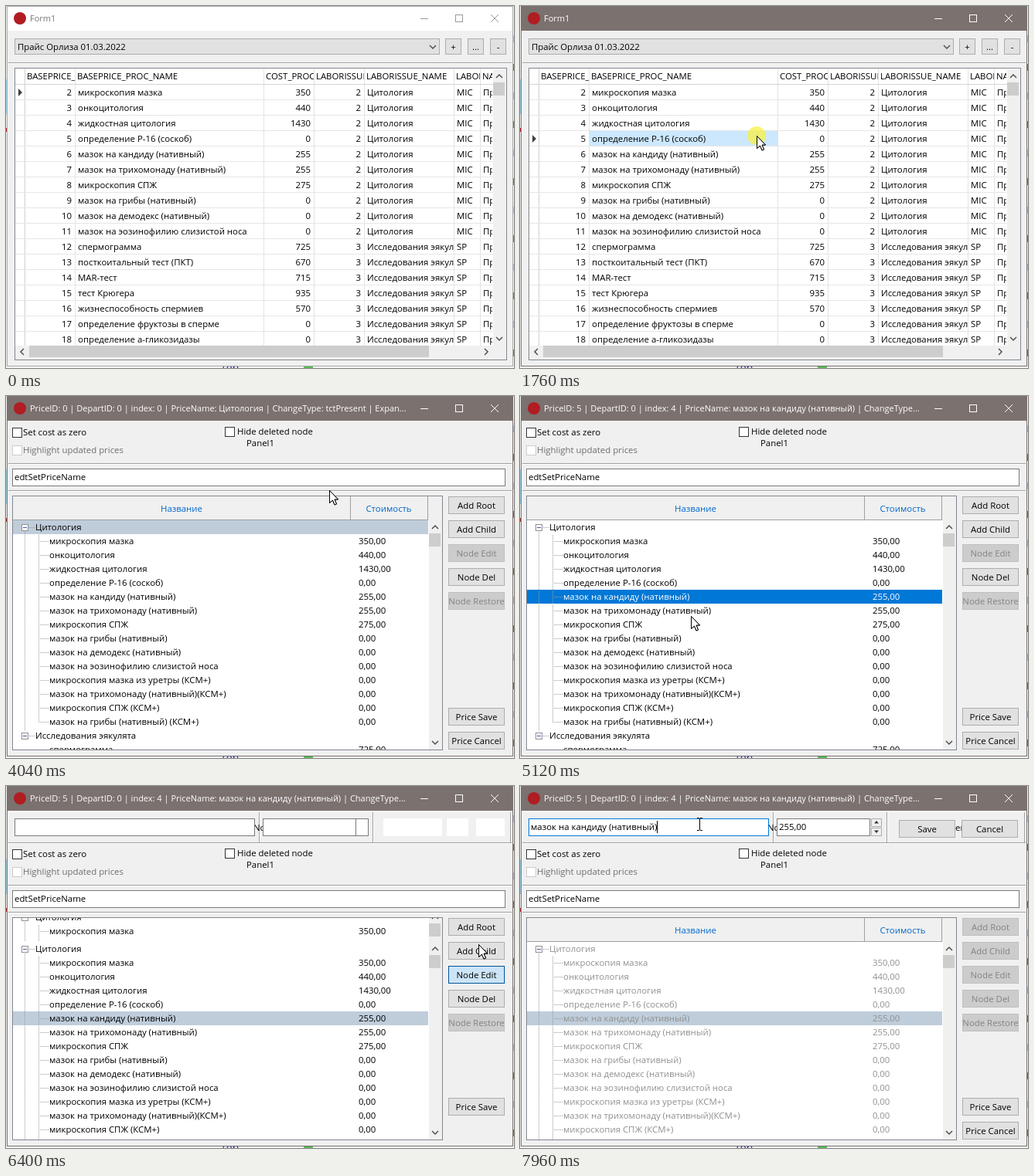
Animation, 657 px wide and 469 px high, one loop 8000 ms. Source, as an HTML page with a canvas:

```html
<!DOCTYPE html>
<html lang="ru">
<head>
<meta charset="utf-8">
<style>
  html, body { margin: 0; width: 100%; height: 100%; overflow: hidden; }
  canvas { display: block; }
</style>
</head>
<body>
<canvas id="stage" width="657" height="469"></canvas>
<script>
const ctx = document.getElementById('stage').getContext('2d');
const LOOP = 8000;
const FACE = '#f0f0f0', BLUE = '#0078d7', TITLE = '#7b716f', GRAY = '#a0a0a0';

const NAMES = ['микроскопия мазка', 'онкоцитология', 'жидкостная цитология',
  'определение P-16 (соскоб)', 'мазок на кандиду (нативный)', 'мазок на трихомонаду (нативный)',
  'микроскопия СПЖ', 'мазок на грибы (нативный)', 'мазок на демодекс (нативный)',
  'мазок на эозинофилию слизистой носа', 'спермограмма', 'посткоитальный тест (ПКТ)',
  'MAR-тест', 'тест Крюгера', 'жизнеспособность спермиев', 'определение фруктозы в сперме',
  'определение а-гликозидазы'];
const COSTS = [350, 440, 1430, 0, 255, 255, 275, 0, 0, 0, 725, 670, 715, 935, 570, 0, 0];
const EXTRA = ['микроскопия мазка из уретры (КСМ+)', 'мазок на трихомонаду (нативный)(КСМ+)',
  'микроскопия СПЖ (КСМ+)', 'мазок на грибы (нативный) (КСМ+)'];
const CHILDREN = [...NAMES.slice(0, 10), ...EXTRA];

// Event times, ms
const ACTIVATE = 1680, PLUS = 3120, EDITOR = 3960, SELECT = 4920, ENABLE = 5200,
  EDIT = 6280, SETTLED = 6600, FOCUS = 7960;
const CLICKS = [[ACTIVATE, 1840], [PLUS, 3320], [SELECT, 5040], [EDIT, 6360], [7840, FOCUS]];
// Pointer path: time, x, y
const PATH = [[80, 464, 390], [440, 395, 114], [760, 349, 174], [1120, 349, 174], [1240, 306, 168],
  [1840, 306, 168], [2480, 420, 414], [2560, 420, 414], [2880, 633, 57], [3120, 576, 55],
  [3320, 575, 57], [3360, 575, 57], [3760, 418, 122], [4040, 418, 122],
  [4760, 226, 262], [4920, 226, 262], [5120, 221, 285], [5250, 230, 302], [5680, 598, 208],
  [5760, 598, 208], [6120, 611, 205], [6640, 611, 205], [7040, 600, 137], [7120, 600, 137],
  [7860, 232, 49], [LOOP, 232, 49]];

let now = 0, mouse = { x: -99, y: -99 }, beam = false;

function pointerAt(t) {
  if (t < PATH[0][0]) return { x: -99, y: -99 };
  const i = PATH.findIndex(p => p[0] > t);
  const [t0, x0, y0] = PATH[i - 1], [t1, x1, y1] = PATH[i];
  const u = (t - t0) / (t1 - t0), e = u * u * (3 - 2 * u);
  return { x: Math.round(x0 + (x1 - x0) * e), y: Math.round(y0 + (y1 - y0) * e) };
}

const hovers = (x, y, w, h) =>
  mouse.x >= x && mouse.x < x + w && mouse.y >= y && mouse.y < y + h;

function rect(x, y, w, h, color) {
  ctx.fillStyle = color;
  ctx.fillRect(x, y, w, h);
}

function box(x, y, w, h, fill, border, line = 1) {
  rect(x, y, w, h, border);
  rect(x + line, y + line, w - 2 * line, h - 2 * line, fill);
}

function path(points, color, width = 1) {
  ctx.beginPath();
  points.forEach(([x, y]) => ctx.lineTo(x, y));
  ctx.strokeStyle = color;
  ctx.lineWidth = width;
  ctx.stroke();
}

function triangle(points, color) {
  ctx.beginPath();
  points.forEach(([x, y]) => ctx.lineTo(x, y));
  ctx.fillStyle = color;
  ctx.fill();
}

function disc(x, y, r, color) {
  ctx.beginPath();
  ctx.arc(x, y, r, 0, 7);
  ctx.fillStyle = color;
  ctx.fill();
}

// y is the middle of the lowercase letters
function text(s, x, y, color = '#000', align = 'left', size = 11.4) {
  ctx.font = size + 'px "Open Sans", "Noto Sans", sans-serif';
  ctx.textAlign = align;
  ctx.fillStyle = color;
  ctx.fillText(s, x, Math.round(y) + 4);
}

function clipped(x, y, w, h, draw) {
  ctx.save();
  ctx.beginPath();
  ctx.rect(x, y, w, h);
  ctx.clip();
  draw();
  ctx.restore();
}

function chevron(x, y, dx, dy, color = '#505050') {
  const tip = [x + dx * 2, y + dy * 2];
  path([[x - dx * 2 - dy * 4, y - dy * 2 - dx * 4], tip, [x - dx * 2 + dy * 4, y - dy * 2 + dx * 4]], color, 1.5);
}

function button(label, x, y, w, h, { off, focus, pressed, still } = {}) {
  const hot = !off && !still && hovers(x, y, w, h);
  if (off) box(x, y, w, h, '#ccc', '#bfbfbf');
  else if (pressed) box(x, y, w, h, '#cce4f7', '#005499');
  else if (hot) box(x, y, w, h, '#e5f1fb', BLUE);
  else box(x, y, w, h, '#e1e1e1', focus ? BLUE : '#adadad', focus ? 2 : 1);
  text(label, x + w / 2, y + h / 2, off ? '#838383' : '#000', 'center');
}

function edit(s, x, y, w, h, focused) {
  const hot = hovers(x, y, w, h);
  beam = beam || hot;
  box(x, y, w, h, '#fff', focused ? BLUE : hot ? '#171717' : '#7a7a7a');
  text(s, x + 3, y + h / 2 - .5);
}

function checkbox(label, x, y, off) {
  box(x, y, 13, 13, '#fff', off ? '#ccc' : '#333');
  text(label, x + (x > 200 ? 16 : 14), y + 6, off ? '#6d6d6d' : '#000');
}

function groove(y) {
  rect(3, y, 651, 1, GRAY);
  rect(3, y + 1, 651, 1, '#fff');
}

function vScroll(x, top, bottom, thumb) {
  rect(x, top, 17, bottom - top, FACE);
  rect(x, thumb, 15, 17, '#cdcdcd');
  chevron(x + 8, top + 9, 0, -1);
  chevron(x + 8, bottom - 9, 0, 1);
}

function desktop() {
  rect(0, 0, 657, 469, '#f4f4f4');
  rect(0, 95, 1, 45, '#9cd3ee');
  rect(0, 158, 1, 5, '#b03030');
  for (let y = 38; y < 460; y += 37) rect(656, y, 1, 9, y % 2 ? '#5572b0' : '#d8c452');
  clipped(260, 467, 200, 2, () => {
    text('тор', 278, 470, '#2020a0', 'left', 14);
    rect(385, 467, 12, 2, '#58b858');
  });
}

function windowFrame(title, active) {
  const ink = active ? '#fff' : '#999';
  box(1, 0, 655, 467, FACE, active ? TITLE : '#aaa');
  rect(2, 1, 653, 31, active ? TITLE : '#fff');
  disc(18, 16, 8, '#b01d22');
  text(title, 31, 16, active ? '#fff' : '#777', 'left', 11);
  rect(536, 16, 10, 1, ink);
  ctx.strokeStyle = ink;
  ctx.lineWidth = 1;
  ctx.strokeRect(581.5, 11.5, 9, 9);
  path([[627, 11], [637, 21]], ink);
  path([[637, 11], [627, 21]], ink);
}

function priceList() {
  const active = now >= ACTIVATE, current = active ? 3 : 0;
  windowFrame('Form1', active);
  box(11, 42, 550, 21, '#e1e1e1', '#adadad');
  text('Прайс Орлиза 01.03.2022', 15, 53);
  chevron(552, 53, 0, 1);
  const pressed = now >= PLUS && now < 3320;
  button('+', 568, 42, 21, 21, { pressed, focus: now >= PLUS, still: now >= 3320 });
  button('...', 597, 42, 21, 21);
  button('-', 626, 42, 21, 21);
  groove(73);

  box(11, 80, 637, 379, '#fff', '#828790');
  const columns = [[25, 'BASEPRICE_ID'], [90, 'BASEPRICE_PROC_NAME'], [334, 'COST_PROC'],
    [399, 'LABORISSUE_ID'], [464, 'LABORISSUE_NAME'], [580, 'LABORISSUE'], [614, 'NAME'], [630]];
  clipped(12, 81, 618, 360, () => {
    columns.slice(0, -1).forEach(([x, label], c) => {
      rect(x - 1, 81, 1, 360, c ? '#e3e3e3' : '#d0d0d0');
      clipped(x, 81, columns[c + 1][0] - x - 1, 20, () => text(label, x + 2, 91));
    });
    rect(12, 101, 618, 1, '#d5d5d5');
    NAMES.forEach((name, i) => {
      const y = 112 + i * 20, cytology = i < 10;
      if (active && i === current) rect(90, y - 10, 243, 19, '#cce8ff');
      rect(12, y + 9, 618, 1, '#e6e6e6');
      text(String(i + 2), 85, y, '#000', 'right');
      text(name, 93, y);
      text(String(COSTS[i]), 394, y, '#000', 'right');
      text(cytology ? '2' : '3', 459, y, '#000', 'right');
      clipped(464, y - 10, 115, 20, () => text(cytology ? 'Цитология' : 'Исследования эякулята', 467, y));
      text(cytology ? 'MIC' : 'SP', 583, y);
      clipped(614, y - 10, 15, 20, () => text('Прайс', 617, y));
    });
  });
  const y = 112 + current * 20;
  triangle([[16, y - 5], [21, y], [16, y + 5]], '#404040');
  vScroll(630, 82, 440, 99);
  rect(12, 440, 635, 18, FACE);
  rect(30, 440, 517, 15, '#cdcdcd');
  chevron(21, 448, -1, 0);
  chevron(621, 448, 1, 0);
}

function dots(x, y, dx, dy, length) {
  for (let d = 0; d < length; d += 2) rect(x + dx * d, y + dy * d, 1, 1, '#999');
}

function treeRoot(label, y, ink) {
  dots(30, y, 1, 0, 7);
  box(20, y - 4, 9, 9, '#fff', '#919191');
  rect(22, y, 5, 1, '#4b5da8');
  text(label, 38, y, ink);
}

function treeRows(top, selected, disabled) {
  const rowY = i => top + 9 + i * 18;
  const ink = disabled ? '#909090' : '#000';
  const focused = now >= SELECT && now < EDIT;
  rect(9, top, 555, 458 - top, '#fff');
  rect(9, rowY(selected) - 9, 537, 18, focused ? BLUE : '#bfcddb');
  dots(24, rowY(0) + 6, 0, 1, 258);
  dots(42, rowY(0) + 10, 0, 1, 243);
  treeRoot('Цитология', rowY(0), ink);
  treeRoot('Исследования эякулята', rowY(15), ink);
  const child = (name, cost, i) => {
    const color = focused && i === selected ? '#fff' : ink;
    dots(42, rowY(i), 1, 0, 13);
    text(name, 56, rowY(i), color);
    text(cost + ',00', 456, rowY(i), color);
  };
  CHILDREN.forEach((name, i) => child(name, i < 10 ? COSTS[i] : 0, i + 1));
  child('спермограмма', 725, 16);
  vScroll(547, top, 458, top + 17);
}

function treeHeader(y) {
  rect(9, y, 555, 31, FACE);
  rect(9, y + 30, 537, 1, GRAY);
  for (const x of [445, 545]) rect(x, y, 1, 31, GRAY);
  text('Название', 227, y + 16, '#0066cc', 'center');
  text('Стоимость', 495, y + 16, '#0066cc', 'center');
}

function editPanel(repainting) {
  rect(3, 33, 651, 1, '#fff');
  rect(3, 34, 1, 39, '#fff');
  for (const x of [327, 474, 652]) {
    rect(x, 34, 1, 39, GRAY);
    rect(x + 1, 34, 1, 39, '#fff');
  }
  groove(73);
  clipped(320, 42, 12, 24, () => text('Node', 320, 54));
  edit(repainting ? '' : NAMES[4], 11, 42, 311, 23, now >= FOCUS);
  if (now >= FOCUS) rect(Math.round(14 + ctx.measureText(NAMES[4]).width), 45, 1, 16, '#000');
  edit(repainting ? '' : '255,00', 332, 42, 121, 23);
  if (repainting) {
    box(452, 42, 17, 23, '#fff', '#7a7a7a');
    for (const [x, w] of [[488, 76], [570, 28], [608, 37]]) rect(x, 42, w, 23, '#fff');
    return;
  }
  for (const [y, dir] of [[42, -1], [54, 1]]) {
    const base = y + 5 - dir * 1.5;
    box(454, y, 14, 11, FACE, '#adadad');
    triangle([[458, base], [464, base], [461, y + 5 + dir * 2]], '#333');
  }
  text('er', 563, 54);
  button('Save', 490, 44, 73, 23);
  button('Cancel', 571, 44, 73, 23);
}

function priceEditor() {
  const selected = now >= SELECT ? 5 : 0;
  const editing = now >= EDIT, repainting = editing && now < SETTLED, locked = now >= SETTLED;
  const shift = editing ? 41 : 0;
  windowFrame(selected
    ? 'PriceID: 5 | DepartID: 0 | index: 4 | PriceName: мазок на кандиду (нативный) | ChangeType...'
    : 'PriceID: 0 | DepartID: 0 | index: 0 | PriceName: Цитология | ChangeType: tctPresent | Expan...', true);
  if (editing) editPanel(repainting);
  checkbox('Set cost as zero', 8, 41 + shift);
  checkbox('Highlight updated prices', 8, 64 + shift, true);
  checkbox('Hide deleted node', 283, 40 + shift);
  text('Panel1', 311, 61 + shift);
  groove(87 + shift);
  edit('edtSetPriceName', 8, 94 + shift, 638, 23);
  groove(122 + shift);

  box(8, 129 + shift, 557, 330 - shift, '#fff', '#828790');
  clipped(9, 130 + shift, 555, 328 - shift, () => {
    if (repainting) treeRows(161, selected, false);
    else treeHeader(130 + shift);
    clipped(9, 161 + shift, 555, 297 - shift, () => treeRows(161 + shift, selected, locked));
  });

  const side = (label, y, options) => button(label, 572, y, 73, 23, { still: repainting, ...options });
  side('Add Root', 130 + shift, { off: locked });
  side('Add Child', 161 + shift, { off: locked });
  side('Node Edit', 192 + shift, { off: now < ENABLE || locked, pressed: repainting });
  side('Node Del', 223 + shift, { off: locked });
  side('Node Restore', 254 + shift, { off: true });
  side('Price Save', 404);
  if (!repainting) side('Price Cancel', 435);
}

function pointer() {
  const { x, y } = mouse;
  if (CLICKS.some(([from, to]) => now >= from && now < to)) disc(x, y, 12, 'rgba(250,240,60,.72)');
  if (beam) {
    rect(x, y - 7, 1, 15, '#000');
    for (const end of [y - 8, y + 8]) {
      rect(x - 3, end, 3, 1, '#000');
      rect(x + 1, end, 3, 1, '#000');
    }
    return;
  }
  const arrow = [[0, 0], [0, 16], [4, 12.5], [6.5, 18.5], [9, 17.5], [6.5, 11.5], [11, 11.5], [0, 0]];
  ctx.save();
  ctx.translate(x + .5, y + .5);
  ctx.fillStyle = '#fff';
  path(arrow, '#000');
  ctx.fill();
  path(arrow, '#000');
  ctx.restore();
}

function draw() {
  now = performance.now() % LOOP;
  mouse = pointerAt(now);
  beam = false;
  desktop();
  if (now < EDITOR) priceList();
  else priceEditor();
  pointer();
  requestAnimationFrame(draw);
}
draw();
</script>
</body>
</html>
```
